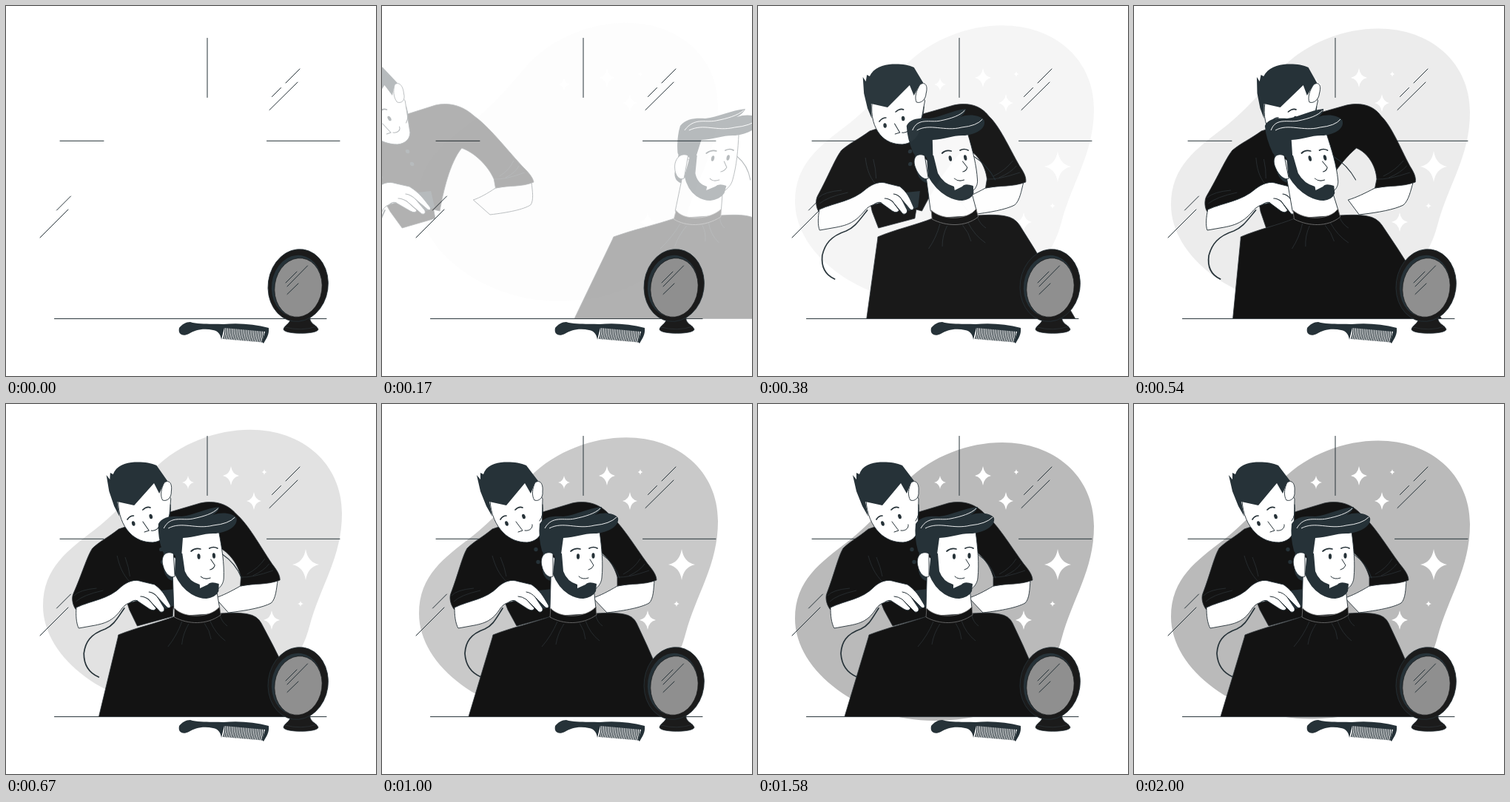
An HTML page that plays this animation: 500x500 px, repeating every 2040 ms.

```html
<!DOCTYPE html>
<html lang="en">
<head>
<meta charset="utf-8">
<title>Barber</title>
<style>
  html, body { margin: 0; width: 100%; height: 100%; overflow: hidden; background: #fff; }
  svg { display: block; width: 100%; height: 100%; }
  .line { fill: none; stroke: #263238; stroke-width: 1; stroke-linecap: round; }
  .slate { fill: #263238; }
  .cloth { fill: #131313; stroke: #30363a; stroke-width: .8; }
  .skin { fill: #fff; stroke: #263238; stroke-width: .9; stroke-linejoin: round; }
  .fold { fill: none; stroke: #2b3235; stroke-width: .8; }
  .shine { fill: none; stroke: #fff; stroke-width: .9; }
  .brow { fill: none; stroke: #263238; stroke-width: 1.7; stroke-linecap: round; }
</style>
</head>
<body>
<svg viewBox="0 0 500 500">
  <path id="blob" fill="#bababa" d="M330 52C400 52 454 97 454 165C454 225 425 262 410 318C390 395 320 428 238 428C140 428 50 362 50 290C50 238 85 214 120 187S178 130 200 105C235 70 285 52 330 52Z"/>
  <g id="stars" fill="#fff"></g>
  <path class="line" d="M272 43.500V123.500M73 182.300H132M352.500 182.300H451M65.500 422.600H433M397 85L378 104M371.500 110.500L359.500 122.500M394 103L356 140.500M87.500 257L68.500 276M84 275L46 313"/>

  <g id="barber">
    <path class="skin" d="M318 246C306 253 295 259 285 262L304 282C330 279 350 275 361 269C367 263 367 250 368 238Z"/>
    <path class="cloth" d="M149 169C136 180 125 185 115 195C108 207 103 230 93 256C90 263 94 274 98 278L137 266L160 252L170 278L182 300L229 287V275L237 277C246 252 262 212 282 192C298 198 313 215 318 234V246C337 242 353 245 371 238C371 231 365 223 359 216C340 190 324 163 307 149C293 134 276 130 257 134L217 146Z"/>
    <path class="fold" d="M149 205C153 219 158 230 168 240M160 207Q166 221 168 233M94 259Q101 251 124 249M97 267Q106 258 133 252M318 234Q333 235 361 225M326 230Q341 222 349 209M334 232Q349 225 355 216"/>
    <g class="slate"><circle cx="208" cy="196.500" r="2.700"/><circle cx="211" cy="213.500" r="2.700"/><path d="M211 252L230 250L231 272L219 277L200 260Z"/></g>
    <path class="line" stroke-width="1.700" style="stroke-width:1.700" d="M163 276C154 290 150 299 139 304C119 311 113 322 112 337C113 354 122 364 134 369"/>
    <path class="skin" d="M98 275C119 265 141 264 157 247C165 240 174 236 185 240L202 244C209 249 214 254 219 262L225 272Q226 277 221 275L207 261L217 276Q218 282 212 281L195 264L206 276Q204 281 197 277L180 266C171 268 165 269 160 276C150 292 140 296 125 299L103 303C99 296 98 285 98 275Z"/>
    <path class="line" d="M207 261Q202 255 195 254M195 264Q189 260 184 260M180 266Q176 264 171 268"/>
    <path class="skin" d="M146 130C147 149 154 164 164 174C173 183 184 187 196 187C207 186 214 180 216 171L217 128L198 100L168 122Z"/>
    <path class="slate" d="M128 96L133 102L133 93L137 95C140 84 153 79 165 78.500C175 78 187 79 195 83L211 104L206 108L201 121L193 107L168 137L145 132L149 152L141 138L133 118Z"/>
    <path class="skin" d="M207 106C213 102 218 107 217 118C218 127 212 132 206 130C202 124 203 114 207 106Z"/>
    <path class="line" d="M217 136Q219 150 213 158M181 159L190 171L184 173M193 171C200 172 204 167 203 163"/>
    <path class="brow" d="M160 156Q163 151 168 151M180 143Q185 138 190 140"/>
    <ellipse class="slate" cx="168.500" cy="161.500" rx="2.200" ry="3.400" transform="rotate(-18 168.500 161.500)"/>
    <ellipse class="slate" cx="191.500" cy="152" rx="2.200" ry="3.400" transform="rotate(-18 191.500 152)"/>
  </g>

  <g id="client">
    <path class="line" d="M297 203Q314 215 321 235"/>
    <path class="slate" d="M218 190L217 226Q219 238 231 240V195Z"/>
    <path class="skin" d="M229 205L227 277C240 294 275 292 289 276L286 248Z"/>
    <path class="skin" d="M240 178L234 205C236 232 248 252 265 256C284 257 296 247 297 235C299 215 297 195 294 172Z"/>
    <path class="slate" d="M234 200L231 230Q238 248 252 257Q262 263 272 263Q285 261 289 253L290 243Q279 239 275 244L264 249V244Q250 240 245 226L243 202Z"/>
    <path class="skin" d="M231 202C219 197 213 208 216 219C218 229 225 236 231 233Z"/>
    <path class="slate" d="M213 162C219 152 232 151 245 152C262 150 278 141 297 139Q295 146 287 150C301 145 315 148 319 154C321 165 306 173 290 175C274 174 263 180 245 181L242 203L234 206L229 201C222 199 218 204 216 198Q211 179 213 162Z"/>
    <path class="shine" d="M220 168C230 150 246 158 260 155C275 152 288 148 295 141M226 168C245 158 263 170 287 164Q308 162 317 153"/>
    <path class="line" d="M281 210L286 218Q284 223 279 224M266 233Q271 238 279 235"/>
    <path class="brow" d="M255 199Q261 194 268 196M280 195Q286 192 291 195"/>
    <ellipse class="slate" cx="265" cy="206" rx="2.100" ry="3.700"/>
    <ellipse class="slate" cx="285.500" cy="205" rx="2.100" ry="3.700"/>
    <path class="cloth" d="M117 422.500L149 316L150 312C175 302 204 296 228 287L290 283C305 282 318 282 327 284Q339 286 344 296C364 337 381 380 399 422.500Z"/>
    <path class="cloth" style="stroke:#777" d="M228 276C240 290 275 290 289 274L290 285C270 299 245 298 227 288Z"/>
    <path class="fold" d="M237 294Q229 313 216 328M246 297Q237 311 235 325M267 296Q274 306 275 318M275 293Q281 310 294 320M289 286Q291 295 298 300"/>
  </g>

  <g id="comb">
    <path class="slate" d="M234 435C238 430 243 427 249 427C262 431 280 429 294 430C315 428 336 430 355 435C356 444 352 449 348 456L346 454L350 440L295 435L291 451C290 443 286 439 280 438C266 435 255 438 247 443C239 447 232 444 234 435Z"/>
    <path id="teeth" fill="none" stroke="#263238" stroke-width="1.300"/>
  </g>

  <g id="mirror">
    <path fill="#1b1b1b" stroke="#263238" stroke-width=".8" d="M384 420C386 429 376 431 375 437C376 444 421 444 422 437C420 431 409 429 411 420Z"/>
    <path class="fold" d="M377 434Q399 440 420 433"/>
    <ellipse cx="394.700" cy="377.500" rx="40.500" ry="49" fill="#1b1b1b" stroke="#263238" stroke-width=".8" transform="rotate(8 394.700 377.500)"/>
    <ellipse class="slate" cx="393" cy="378.500" rx="34" ry="42" transform="rotate(8 393 378.500)"/>
    <ellipse cx="395" cy="380.500" rx="32" ry="40" fill="#8f8f8f" stroke="#1b1b1b" stroke-width=".7" transform="rotate(8 395 380.500)"/>
    <path class="line" d="M407.500 351L380 379M393 359L378 374M395 375L380 389.500"/>
  </g>
</svg>
<script>
const LOOP = 2040;
const $ = id => document.getElementById(id);

// x, y, half width, half height
const stars = [[246, 106, 8, 9], [304, 97, 11, 13], [349, 92, 3.5, 4], [335, 131, 10, 12],
  [405, 217, 18, 21], [398, 270, 4, 4], [359, 292, 11, 13]];
$('stars').innerHTML = stars.map(([x, y, w, h]) =>
  `<path transform="translate(${x} ${y}) scale(${w} ${h})" d="M0-1Q.15-.15 1 0Q.15.15 0 1Q-.15.15-1 0Q-.15-.15 0-1Z"/>`).join('');

let teeth = '';
for (let i = 0; i < 23; i++) {
  const x = 296 + i * 2.35, drop = i * .2;
  teeth += `M${x} ${433 + drop}Q${x + .3} ${443 + drop} ${x - 2.5} ${450 + drop}`;
}
$('teeth').setAttribute('d', teeth);

const bezier = (x1, y1, x2, y2) => x => {
  const at = (a, b, s) => 3 * (1 - s) * (1 - s) * s * a + 3 * (1 - s) * s * s * b + s * s * s;
  let lo = 0, hi = 1;
  for (let i = 0; i < 24; i++) {
    const mid = (lo + hi) / 2;
    if (at(x1, x2, mid) < x) lo = mid; else hi = mid;
  }
  return at(y1, y2, hi);
};
const inOut = bezier(.42, 0, .58, 1);
const spring = bezier(.36, -.01, .5, 1.38);
const clamp = v => Math.max(0, Math.min(1, v));

// Rush in from one side with a lean that swings past upright and settles.
function rushIn(id, side, cy, t) {
  let shift = 0, lean = 0, alpha = 1;
  if (t < 600) {
    const p = spring(t / 600);
    shift = 250 * (1 - p);
    lean = 30 * p - 20;
    alpha = clamp(p);
  } else if (t < 800) lean = 10 - 12 * spring((t - 600) / 200);
  else if (t < 1000) lean = -2 * (1 - spring((t - 800) / 200));
  const k = Math.tan(lean * side * Math.PI / 180);
  $(id).setAttribute('transform', `matrix(1 0 ${k} 1 ${side * shift - k * cy} 0)`);
  $(id).setAttribute('opacity', alpha);
}

function draw(now) {
  const t = now % LOOP + 10;
  const p = inOut(clamp(t / 1500));
  const rise = 10 * inOut(clamp((t - 1500) / 1500));
  $('blob').setAttribute('transform', `translate(0 ${-30 * (1 - p) - rise})`);
  $('blob').setAttribute('opacity', p);
  rushIn('barber', -1, 224, t);
  rushIn('client', 1, 281, t);
}

const start = performance.now();
function tick() {
  draw(performance.now() - start);
  requestAnimationFrame(tick);
}
tick();
</script>
</body>
</html>
```
